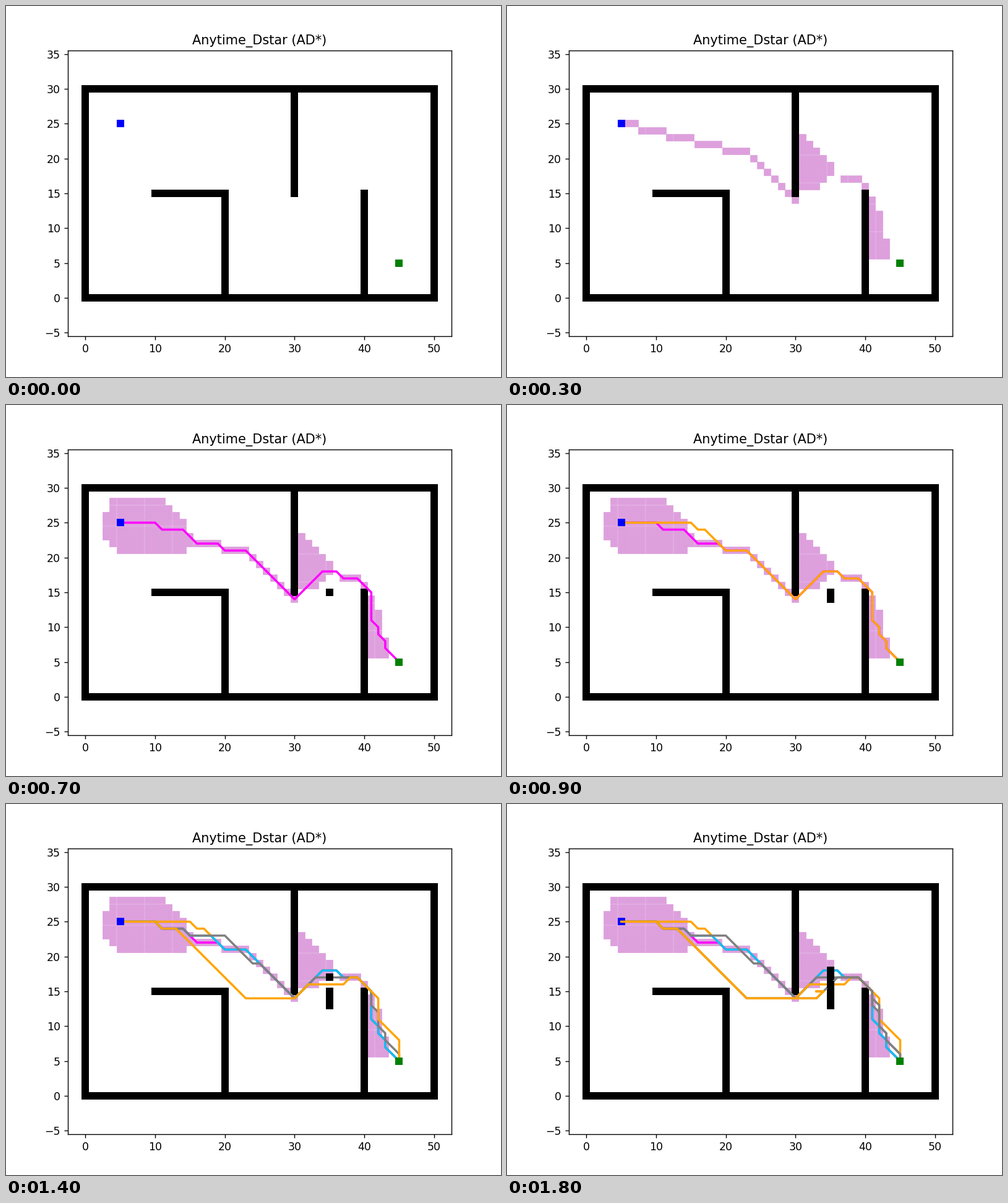
Write a matplotlib script that moves like this. It is 800 px wide and 600 px high and loops after 1900 ms.

```python
import math

import matplotlib.pyplot as plt
import numpy as np
from matplotlib.animation import FuncAnimation
from matplotlib.path import Path

FRAMES, STEP_MS, DPI = 19, 100, 125
START, GOAL = (5, 25), (45, 5)
SOLID = 2 * 72 / DPI  # edge of two full pixels, leaves no seams

fig, ax = plt.subplots(figsize=(800 / DPI, 600 / DPI), dpi=DPI)
timeline = []  # (first visible frame, artist)


def squares(cells, color, since=0, **kw):
    line, = ax.plot(*zip(*cells), "s", color=color, **kw)
    timeline.append((since, line))


def route(cells, color, since, **kw):
    line, = ax.plot(*zip(*cells), color=color, linewidth=2, **kw)
    timeline.append((since, line))


def walk(*stops):
    """Grid cells from stop to stop, each leg straight, then diagonal."""
    x, y = stops[0]
    cells = [(x, y)]
    for gx, gy in stops[1:]:
        while (x, y) != (gx, gy):
            dx, dy = gx - x, gy - y
            if abs(dx) >= abs(dy):
                x += int(np.sign(dx))
            if abs(dy) >= abs(dx):
                y += int(np.sign(dy))
            cells.append((x, y))
    return cells


def filled(*corners):
    """Grid cells inside a polygon or on its border."""
    grid = [(x, y) for x in range(51) for y in range(31)]
    shape = Path(corners + corners[:1], closed=True)
    near = [shape.contains_points(np.add(grid, shift))
            for shift in ((.02, .01), (-.02, -.01), (.01, -.02), (-.01, .02))]
    return [c for c, hit in zip(grid, np.any(near, axis=0)) if hit]


def spread(cell):
    """Order of the first search: goal to start, widening at the wall."""
    x, y = cell
    if 31 <= x <= 34:
        return -33, abs(x + y - 52)
    return -x, -y


# Walls
squares(walk((0, 0), (50, 0), (50, 30), (0, 30), (0, 0))
        + walk((10, 15), (20, 15), (20, 0))
        + walk((30, 15), (30, 30)) + walk((40, 15), (40, 0)),
        "k", mew=SOLID)

# Expanded cells
trail = filled((41, 6), (41, 15), (42, 12), (43, 8), (44, 6))
trail += filled((31, 15), (31, 23), (36, 18), (35, 18), (33, 16), (32, 16))
trail += [(x, min(17, 56 - x)) for x in range(37, 41)]
trail += [(x, min(26 - x // 4, 44 - x)) for x in range(6, 31)]
trail.sort(key=spread)

blob = filled((4, 28), (11, 28), (14, 25), (15, 23), (15, 22), (14, 21),
              (5, 21), (3, 23), (3, 26))
blob = [c for c in blob if c not in trail]
blob.sort(key=lambda c: math.dist(c, START))

batches = np.array_split(trail, 2) + np.array_split(blob, 2)
for n, batch in enumerate(batches):
    squares(batch, "plum", 2 + n, zorder=1)

# Routes, each followed by a new obstacle
crest = [(20, 21), (30, 14), (34, 18), (37, 17), (41, 15), (42, 10), (43, 8)]
low = [START, (11, 24), (23, 14)]
drop = [(43, 9), (45, 6)]
plans = [
    ("magenta", 15, [START, (11, 24), (16, 22), *crest]),
    ("orange", 14, [START, (16, 24), *crest]),
    ("deepskyblue", 13, [START, (11, 24), (15, 23), *crest]),
    ("gray", 17, [START, (11, 24), (15, 23), (24, 19), (30, 14), (33, 17),
                  (41, 15), (42, 12), *drop]),
    ("orange", 18, [*low, (32, 16), (38, 17), (42, 14), (45, 8)]),
    ("gray", 16, [*low, (36, 17), (41, 15), (42, 13), *drop]),
]
for n, (color, block_y, stops) in enumerate(plans):
    route(walk(*stops, GOAL), color, 6 + 2 * n)
    squares([(35, block_y)], "k", 7 + 2 * n, mew=SOLID)

# Start and goal stay above all but the last route, which is stuck bouncing
squares([START], "b", mew=SOLID, zorder=3)
squares([GOAL], "g", mew=SOLID, zorder=3)
route(walk(*low, (34, 15)) + [(33, 15), (34, 15)] * 30, "orange", 18, zorder=4)

half = 27.5 * 462 / 620  # equal scale on both axes
ax.set_xlim(-2.5, 52.5)
ax.set_ylim(15 - half, 15 + half)
ax.set_xticks(range(0, 51, 10))
ax.set_yticks(range(-5, 36, 5))
ax.set_title("Anytime_Dstar (AD*)")


def update(frame):
    for since, artist in timeline:
        artist.set_visible(frame >= since)
    return [artist for _, artist in timeline]


anim = FuncAnimation(fig, update, frames=FRAMES, interval=STEP_MS,
                     repeat=True, repeat_delay=0, blit=False)
plt.show()
```
